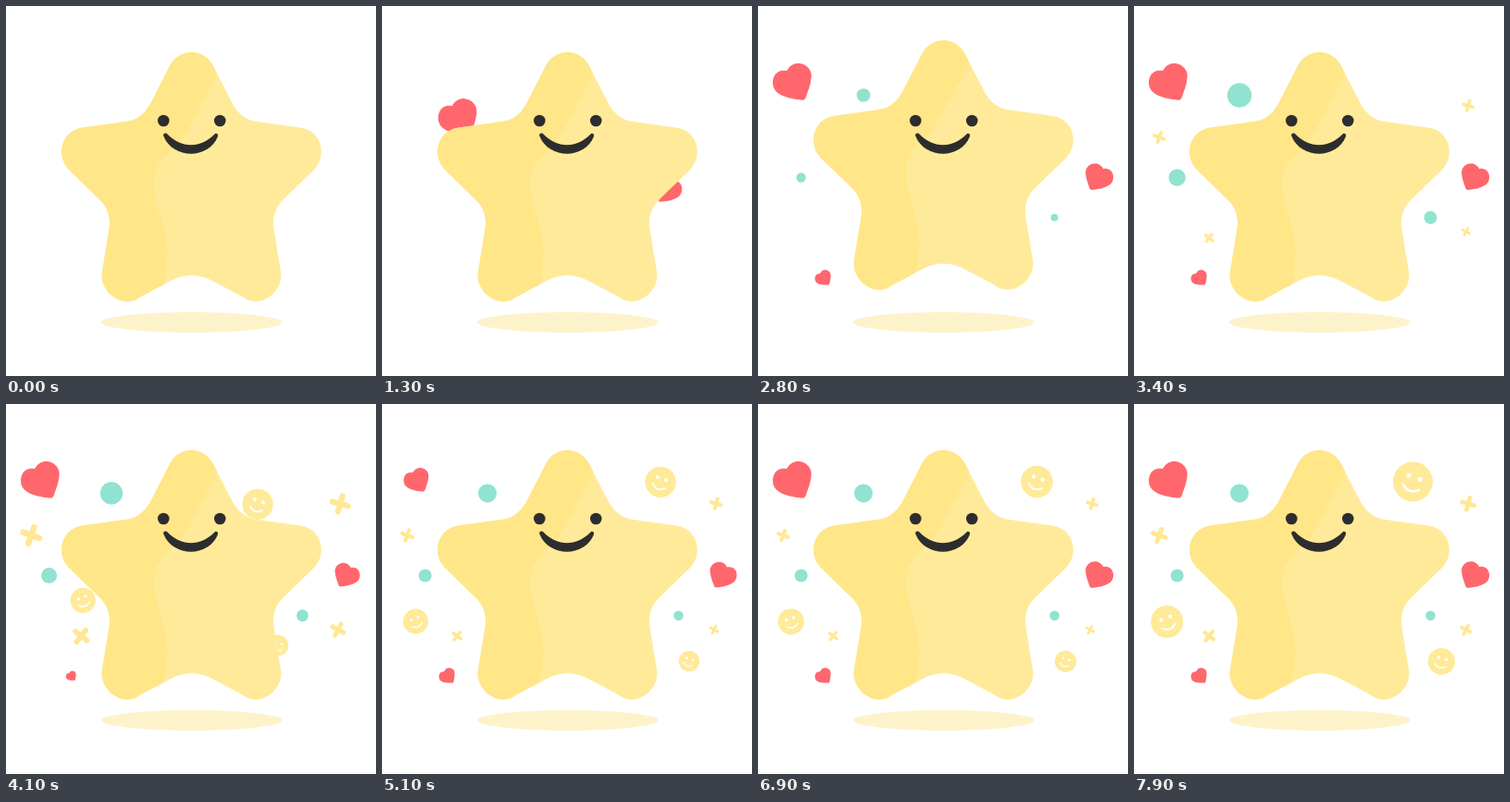
Animation, 400 px wide and 400 px high, one loop 9.95 s. Source, as an HTML page:

```html
<!DOCTYPE html>
<html lang="en">
<head>
<meta charset="utf-8">
<title>Happy star</title>
<style>
  html, body { margin: 0; width: 100%; height: 100%; overflow: hidden; background: #fff; }
  svg { display: block; width: 100%; height: 100%; }
  .heart { fill: #ff676d; }
  .dot { fill: #8fe3d0; }
  .plus { fill: none; stroke: #ffe895; stroke-width: 5; stroke-linecap: round; }
  .smiley { fill: #ffea99; }
  .smiley .eye { fill: #fff; }
  .smiley path { fill: none; stroke: #fff; stroke-width: 2.4; stroke-linecap: round; }
  .face { fill: #2d2d2d; }
</style>
</head>
<body>
<svg viewBox="0 0 400 400">
  <defs>
    <path id="star" d="M176.5 66C186.5 44.5 214.5 44.5 224.5 66L244 104C249 114 257 122 268 124.5L318 131.5
      C340 134 349 161 332 178L301 208C292 216 288 227 289 238L297 287C301 309 274 329 256 314.5
      L221 296C208 289.5 193 289.5 180 296L145 314.5C127 329 100 309 104 287L112 238
      C113 227 109 216 100 208L69 178C52 161 61 134 83 131.5L133 124.5C144 122 152 114 157 104Z"/>
    <clipPath id="body-clip"><use href="#star"/></clipPath>
    <path id="heart" d="M-6 -12C-3 -18 3 -20.5 8 -20C16 -19 22 -12 20.5 -4C20 3 17 10 15 16
      C14 19.5 12.5 20 9 19.5C1 18.5 -8 17 -14 13C-21 9 -23 0 -19 -7C-16 -12 -11 -13 -6 -12Z"/>
    <path id="plus" d="M-7 0H7M0 -7V7"/>
    <g id="smiley">
      <circle r="21.5"/>
      <circle class="eye" cx="-6.3" cy="-5" r="2.6"/>
      <circle class="eye" cx="6.3" cy="-5" r="2.6"/>
      <path d="M-9.5 6Q0 15 9.5 6"/>
    </g>
    <circle id="dot" r="10"/>
  </defs>
  <ellipse cx="200.7" cy="342" rx="98" ry="11" fill="#fdf3cb"/>
  <g id="items"></g>
  <g id="body">
    <use href="#star" fill="#ffea99"/>
    <path clip-path="url(#body-clip)" fill="#ffe688" d="M228 75C214 103 203 122 192 142C183 158 160 165 160 190
      C160 220 174 235 174.5 265C174.5 280 172 292 170 302V330H40V30H228Z"/>
  </g>
  <g class="face">
    <circle cx="170.3" cy="124" r="6.3"/>
    <circle cx="231.3" cy="124" r="6.3"/>
    <path d="M170 139.5C171 137 173.5 137 174.5 138.5C189 154 211 154 225.5 138.5
      C226.5 137 230 138 229 141C219 166 181 166 170.5 141Z"/>
  </g>
</svg>
<script>
  const LOOP = 9950, STEP = 100, END = 7900;
  const items = document.getElementById('items');
  const body = document.getElementById('body');

  const progress = (t, from, to) => Math.min(1, Math.max(0, (t - from) / (to - from)));
  const smooth = u => (1 - Math.cos(Math.PI * u)) / 2;
  const bump = (t, from, to) => Math.sin(Math.PI * progress(t, from, to)) ** 2;

  // Eased value through [time, value] stops.
  function track(t, stops) {
    let value = stops[0][1];
    for (let i = 1; i < stops.length; i++) {
      const [t0] = stops[i - 1], [t1, v] = stops[i];
      value += (v - stops[i - 1][1]) * smooth(progress(t, t0, t1));
    }
    return value;
  }

  // Decelerating flight from (200, y0) to the item's place.
  function fly(item, t, y0, from, to) {
    const left = (1 - progress(t, from, to)) ** 2;
    return [item.x + (200 - item.x) * left, item.y + (y0 - item.y) * left];
  }

  const motions = {
    heart: (h, t) => ({
      pos: fly(h, t, 221, h.start, 2620),
      size: 1 - 0.36 * bump(t, ...h.beat)
    }),
    smiley: (s, t) => ({
      pos: fly(s, t, s.y0, 3130, 5230),
      size: track(t, [[6600, 0.775], [END, 1]])
    }),
    dot: (d, t) => ({
      pos: [d.x, d.y],
      size: track(t, [[2000, 0], [3500, 1.33], [5000, 1]])
    }),
    plus: (p, t) => ({
      pos: [p.x, p.y],
      size: track(t, [[2700, 0], [3950, 1.33], [5450, 0.76], [6700, 0.76], [7600, 1]])
    })
  };

  const parts = [
    { kind: 'heart', x: 37, y: 82, k: 1, start: 100, beat: [4500, 5800] },
    { kind: 'heart', x: 369, y: 184.7, k: 0.72, flip: true, start: 400, beat: [3850, 5250] },
    { kind: 'heart', x: 70.3, y: 294, k: 0.42, turn: -8, start: 800, beat: [3450, 4750] },
    { kind: 'smiley', x: 301.5, y: 84, k: 1, turn: 20, y0: 168 },
    { kind: 'smiley', x: 35.7, y: 235.3, k: 0.815, turn: -20, y0: 156 },
    { kind: 'smiley', x: 332.5, y: 278.3, k: 0.675, turn: 17, y0: 219 },
    { kind: 'dot', x: 114, y: 96.5, k: 1 },
    { kind: 'dot', x: 46.6, y: 185.5, k: 0.7 },
    { kind: 'dot', x: 320.5, y: 228.7, k: 0.53 },
    { kind: 'plus', x: 27.3, y: 142, k: 1, turn: 20 },
    { kind: 'plus', x: 361.3, y: 107.8, k: 0.95, turn: 16 },
    { kind: 'plus', x: 81.2, y: 250.8, k: 0.87, turn: 38 },
    { kind: 'plus', x: 359, y: 244, k: 0.75, turn: 28 }
  ];

  for (const part of parts) {
    part.el = document.getElementById(part.kind).cloneNode(true);
    part.el.removeAttribute('id');
    part.el.setAttribute('class', part.kind);
    items.append(part.el);
  }

  function draw(t) {
    for (const part of parts) {
      const { pos, size } = motions[part.kind](part, t);
      const k = part.k * size;
      part.el.setAttribute('transform',
        `translate(${pos}) rotate(${part.turn || 0}) scale(${part.flip ? -k : k} ${k})`);
    }
    body.setAttribute('transform', `translate(0 ${-13.4 * bump(t, 2000, 3400)})`);
  }

  function tick(now) {
    const t = Math.floor((now % LOOP) / STEP) * STEP;
    draw(Math.min(t, END));
    requestAnimationFrame(tick);
  }

  draw(0);
  requestAnimationFrame(tick);
</script>
</body>
</html>
```
